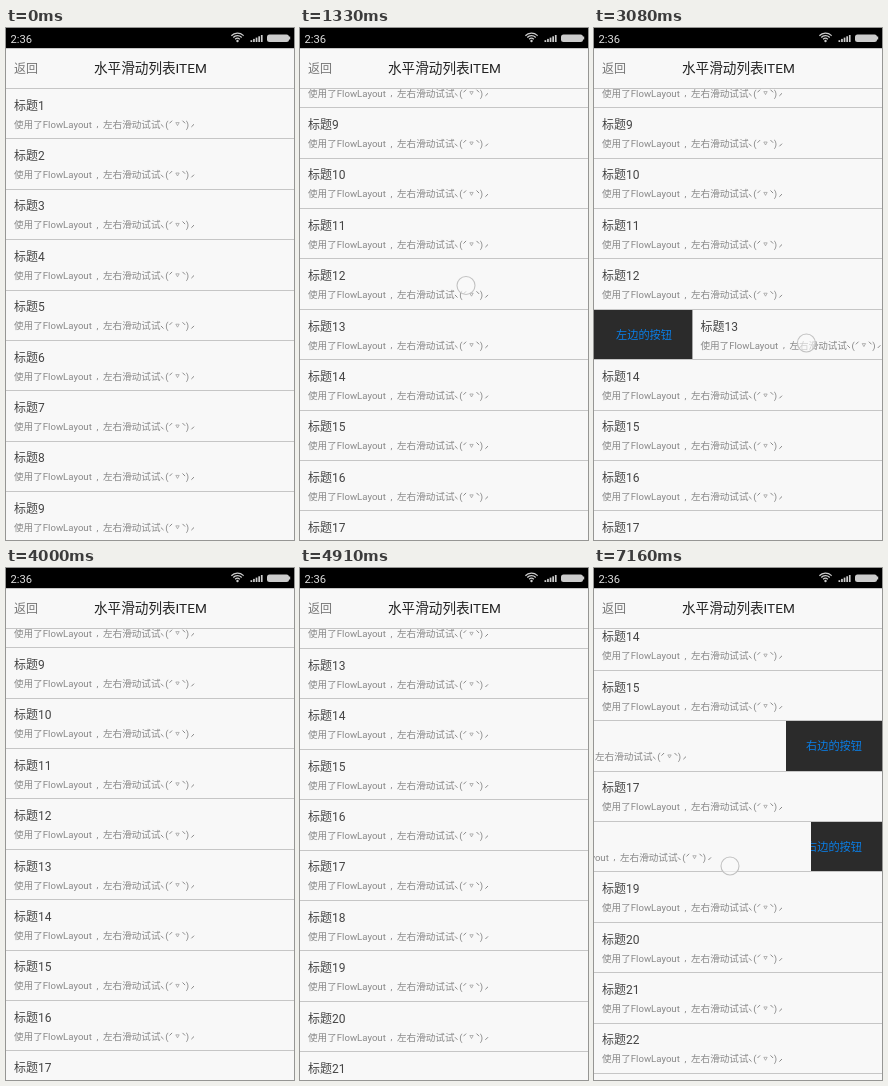
An HTML page with a canvas that plays this animation: 288 px wide and 512 px high, repeating every 7240 ms.

```html
<!DOCTYPE html>
<html lang="zh-CN">
<head>
<meta charset="utf-8">
<style>
html, body { margin: 0; width: 100%; height: 100%; overflow: hidden; background: #f8f8f8; }
canvas { display: block; }
</style>
</head>
<body>
<canvas id="stage" width="288" height="512"></canvas>
<script>
const ctx = document.getElementById('stage').getContext('2d');
const W = 288, H = 512, LOOP = 7240, STEP = 1000 / 12;
const ROW = 50.4, LIST_TOP = 60.4;
const LEFT_WIDTH = 98.4, RIGHT_WIDTH = 96;
const FONT = 'Roboto, "Noto Sans CJK SC", "Noto Sans CJK", sans-serif';
const BG = '#f8f8f8', LINE = '#c6c6c6', PANEL = '#2b2b2b';

// A gesture with a row swipes that row; one without flings the list.
// Times are in steps, x and y are where the finger goes down.
const gestures = [
  { start: 2, end: 14, move: 383.8, x: 171, y: 440 },
  { row: 12, start: 16, end: 21, move: 96, x: 166, y: 257.5 },
  { row: 12, start: 23, end: 27, move: -96, x: 255, y: 272 },
  { row: 13, start: 30, end: 37, move: LEFT_WIDTH, x: 114, y: 315 },
  { row: 13, start: 39, end: 47, move: -LEFT_WIDTH, x: 215, y: 320 },
  { start: 49, end: 59, move: 200.9, x: 160, y: 400 },
  { row: 16, start: 60, end: 65, move: -RIGHT_WIDTH, x: 211, y: 276.5 },
  { row: 16, start: 68, end: 71, move: -64, x: 152, y: 269 },
  { start: 73, end: 82, move: 79, x: 158, y: 371.5 },
  { row: 18, start: 83, end: 86, move: -71, x: 207, y: 298 }
];

const clamp = (v, min, max) => Math.max(min, Math.min(max, v));
const fling = p => 1 - (1 - p) ** 1.8;
const drag = p => p * p * (3 - 2 * p);

function progress(g, step) {
  return clamp((step - g.start) / (g.end - g.start), 0, 1);
}

function travel(g, step) {
  return g.move * (g.row ? drag : fling)(progress(g, step));
}

function scrollAt(step) {
  return gestures.filter(g => !g.row).reduce((sum, g) => sum + travel(g, step), 0);
}

function offsetAt(row, step) {
  return gestures.filter(g => g.row === row)
    .reduce((sum, g) => clamp(sum + travel(g, step), -RIGHT_WIDTH, LEFT_WIDTH), 0);
}

function rect(x, y, w, h, color) {
  ctx.fillStyle = color;
  ctx.fillRect(x, y, w, h);
}

function text(str, x, y, size, color, align = 'left') {
  ctx.font = size + 'px ' + FONT;
  ctx.textAlign = align;
  ctx.fillStyle = color;
  ctx.fillText(str, x, y);
}

function clipped(x, y, w, h, draw) {
  ctx.save();
  ctx.beginPath();
  ctx.rect(x, y, w, h);
  ctx.clip();
  draw();
  ctx.restore();
}

function tick(x, y, slope) {
  ctx.beginPath();
  ctx.moveTo(x - 1.3, y - 1.3 * slope);
  ctx.lineTo(x + 1.3, y + 1.3 * slope);
  ctx.stroke();
}

function drawFace(x, y, color) {
  text('(', x + 5.2, y, 9.6, color);
  text(')', x + 25.8, y, 9.6, color);
  ctx.strokeStyle = color;
  ctx.lineWidth = 1;
  tick(x + 2.2, y - 2, 1);
  tick(x + 10.8, y - 5.6, -1);
  tick(x + 23.8, y - 5.6, 1);
  tick(x + 32.7, y - 2, -1);
  ctx.lineWidth = 0.6;
  ctx.beginPath();
  ctx.moveTo(x + 15.8, y - 5);
  ctx.lineTo(x + 19.2, y - 5);
  ctx.lineTo(x + 17.5, y - 2);
  ctx.closePath();
  ctx.stroke();
}

function drawSubtitle(x, y) {
  const color = '#888';
  text('使用了FlowLayout', x, y, 9.6, color);
  text(',', x + 82.5, y - 0.3, 9.6, color);
  text('左右滑动试试', x + 89, y, 9.6, color);
  drawFace(x + 146, y, color);
}

function drawRow(number, top, offset) {
  const y = Math.floor(top);
  if (offset) {
    const left = offset > 0;
    clipped(left ? 0 : W + offset, y + 1, Math.abs(offset), 50, () => {
      rect(0, y, W, 52, PANEL);
      text(left ? '左边的按钮' : '右边的按钮', left ? 50 : 240, top + 29.5, 11.2, '#0a7ee6', 'center');
    });
  }
  clipped(Math.max(0, offset), y, W - Math.abs(offset), 52, () => {
    text('标题' + number, 8 + offset, top + 21.2, 12, '#444');
    drawSubtitle(8 + offset, top + 39.2);
  });
  rect(0, y, W, 1, LINE);
}

function drawList(step) {
  const scroll = scrollAt(step);
  const first = Math.floor(scroll / ROW);
  clipped(0, 60, W, H - 60, () => {
    for (let i = first; i < first + 11; i++) {
      drawRow(i + 1, LIST_TOP + i * ROW - scroll, offsetAt(i + 1, step));
    }
  });
}

function drawStatusBar() {
  rect(0, 0, W, 20, '#000');
  rect(0, 20, W, 1, LINE);
  text('2:36', 4.5, 14.6, 11.2, '#ddd');
  ctx.strokeStyle = ctx.fillStyle = '#ccc';
  ctx.lineWidth = 1.3;
  for (const r of [3.2, 5.8, 8.4]) {
    ctx.beginPath();
    ctx.arc(231.5, 13.5, r, -Math.PI * 0.76, -Math.PI * 0.24);
    ctx.stroke();
  }
  ctx.beginPath();
  ctx.arc(231.5, 13, 1.2, 0, Math.PI * 2);
  ctx.fill();
  for (let i = 0; i < 5; i++) rect(244.5 + i * 2.6, 12.2 - i * 1.3, 1.7, 1.8 + i * 1.3, '#ccc');
  ctx.beginPath();
  ctx.roundRect(261, 6.5, 22, 7.5, 2.5);
  ctx.fill();
  rect(283, 8.5, 1.2, 3, '#ccc');
}

function drawHeader() {
  rect(0, 20, W, 40, BG);
  text('返回', 8, 44.8, 12, '#777');
  text('水平滑动列表ITEM', 144.4, 45.3, 13.6, '#222', 'center');
  rect(0, 60, W, 1, LINE);
}

function drawTouch(step) {
  // The finger lifts before a fling has run out.
  const g = gestures.find(g => step >= g.start && progress(g, step) <= (g.row ? 1 : 0.5) && step <= g.end);
  if (!g) return;
  const moved = g.move * (g.row ? drag : fling)(progress(g, step));
  ctx.beginPath();
  ctx.arc(g.row ? g.x + moved : g.x, g.row ? g.y : g.y - moved, 9, 0, Math.PI * 2);
  ctx.fillStyle = 'rgba(250,250,250,0.6)';
  ctx.fill();
  ctx.lineWidth = 1.1;
  ctx.strokeStyle = '#c2c2c2';
  ctx.stroke();
}

function frame() {
  const time = performance.now() % LOOP;
  const step = Math.min(86, Math.floor((time + 10.1) / STEP));
  rect(0, 0, W, H, BG);
  drawList(step);
  drawHeader();
  drawStatusBar();
  drawTouch(step);
  requestAnimationFrame(frame);
}
frame();
</script>
</body>
</html>
```
